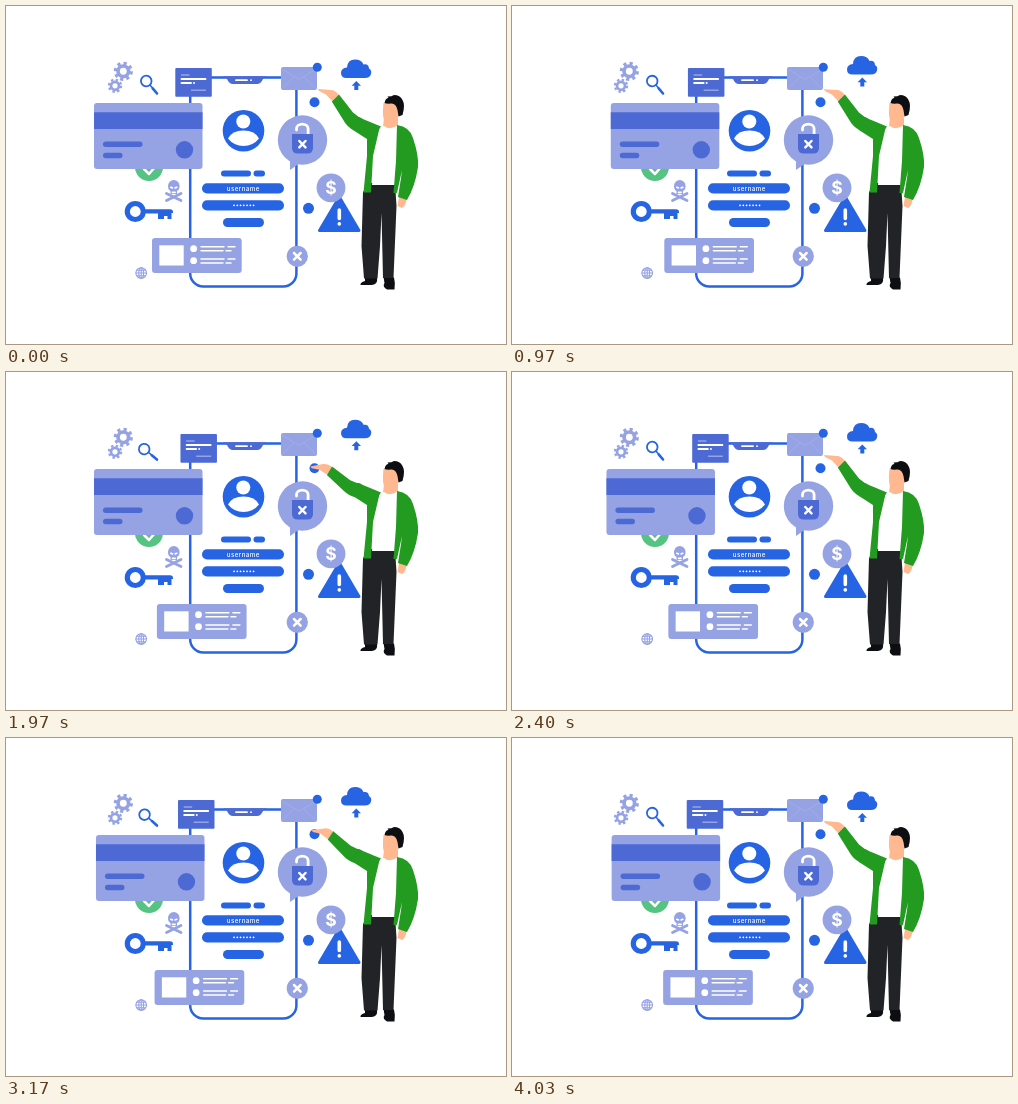
Recreate the animation shown at these times as an HTML page. Size 500 px wide and 338 px high, loop 4070 ms.

```html
<!DOCTYPE html>
<html lang="en">
<head>
<meta charset="utf-8">
<title>Account security</title>
<style>
html, body { margin: 0; width: 100%; height: 100%; overflow: hidden; background: #fff }
svg { display: block; width: 500px; height: 338px }
.b { fill: #2764e3 } .l { fill: #95a2e3 } .m { fill: #4c69d4 } .w { fill: #fff }
.g { fill: #229b20 } .s { fill: #ffb88f } .k { fill: #222327 } .n { fill: #0d0e12 }
.sb, .sl, .sw { fill: none; stroke-linecap: round; stroke-linejoin: round }
.sb { stroke: #2764e3 } .sl { stroke: #95a2e3 } .sw { stroke: #fff }
text { text-anchor: middle; fill: #fff; font-family: Inter, sans-serif }
</style>
</head>
<body>
<svg viewBox="0 0 500 338">
  <!-- gears -->
  <g id="gears" fill="none" stroke="#95a2e3"></g>
  <g id="lens">
    <circle class="sb" cx="139.800" cy="75.400" r="5.300" stroke-width="1.800"/>
    <path class="sb" d="M143.800 79.500L146.200 82" stroke-width="1.600"/>
    <path class="sb" d="M146.500 82.500L151 87.500" stroke-width="2.600"/>
  </g>

  <!-- phone -->
  <rect x="184.200" y="71.500" width="106.200" height="208.900" rx="13" class="sb" stroke-width="2.500"/>
  <path class="m" d="M217 70.300H261L257 73Q255 78 251 78H227Q223 78 221 73Z"/>
  <path class="sw" d="M230 74.200H241M245 74.200h.1" stroke-width="1.800"/>
  <circle class="b" cx="237.500" cy="124.800" r="20.800"/>
  <circle class="w" cx="237.300" cy="115.500" r="7"/>
  <path class="w" d="M222 132.500Q226 124.500 237.500 124.500T253 132.500Q247 140 237.500 140T222 132.500Z"/>
  <g class="b">
    <rect x="215" y="164.500" width="30" height="6" rx="3"/>
    <rect x="247.500" y="164.500" width="11.500" height="6" rx="3"/>
    <rect x="196" y="177.200" width="82" height="10.300" rx="5.100"/>
    <rect x="196" y="194.200" width="82" height="10.300" rx="5.100"/>
    <rect x="217" y="212" width="41" height="9" rx="4.500"/>
  </g>
  <text x="237.300" y="184.500" font-size="6.200" font-weight="500" letter-spacing=".450">username</text>
  <path class="sw" d="M228 199.300H248" stroke-width="1.700" stroke-dasharray=".1 3.150"/>

  <!-- envelope -->
  <rect class="l" x="275" y="61" width="36" height="23" rx="2"/>
  <path d="M276 63L293 73.500L310 63M276 82.500L288 71M310 82.500L298 71" fill="none" stroke="#a8b2e9" stroke-width=".7"/>
  <circle class="b" cx="311.300" cy="61.300" r="4.500"/>

  <!-- lock bubble -->
  <path class="l" d="M284 150V164L297 155Z"/>
  <circle class="l" cx="296.500" cy="134" r="24.700"/>
  <path class="sw" d="M290.500 124V122.500a5.800 4.300 0 0 1 11.600 0V129" stroke-width="2.800"/>
  <path class="m" d="M286 128H307V142Q307 147.500 301 147.500H292Q286 147.500 286 142Z"/>
  <path class="sw" d="M293.300 135l6.200 6.400m0-6.400l-6.200 6.400" stroke-width="2.500"/>

  <!-- badges -->
  <path class="b" d="M333.300 191L353 224.500H313.500Z" stroke="#2764e3" stroke-width="3" stroke-linejoin="round"/>
  <path class="sw" d="M333.300 204V212.500M333.300 217.800v.1" stroke-width="3.600"/>
  <circle class="l" cx="325" cy="181.800" r="14.400"/>
  <text x="325" y="188.200" font-size="17.500" font-weight="700">$</text>
  <circle class="l" cx="291.300" cy="250.300" r="10.600"/>
  <path class="sw" d="M288 247l6.600 6.600m0-6.600l-6.600 6.600" stroke-width="2.500"/>
  <circle class="b" cx="308.500" cy="96.300" r="5"/>
  <circle class="b" cx="302.500" cy="202.300" r="5.500"/>

  <!-- check, key, skull, globe -->
  <circle cx="143" cy="161" r="14" fill="#55c381"/>
  <path class="sw" d="M138 163l5 5 6-7" stroke-width="2.500"/>
  <circle class="sb" cx="129.300" cy="205.500" r="8" stroke-width="5.200"/>
  <path class="b" d="M138 203.300H164Q167 203.300 167 206V207H165.500V213H161.500V210H158V213H152V207.500H138Z"/>
  <path class="sl" d="M160.500 187.500L175 194.500M175 187.500L160.500 194.500" stroke-width="2.800"/>
  <path class="l" d="M162 180a5.800 6 0 0 1 11.600 0Q173.600 184 171 185V188H164.500V185Q162 184 162 180Z"/>
  <path class="sw" d="M164.800 181.300l1.600.6M170.800 181.300l-1.600.6M166.500 186.300h2.600" stroke-width="1.700"/>
  <g class="sl" stroke-width="1.100">
    <circle cx="135.200" cy="267" r="5.300"/>
    <ellipse cx="135.200" cy="267" rx="2.400" ry="5.300"/>
    <path d="M130 267H140.500M131 264.300H139.500M131 269.700H139.500M135.200 262V272"/>
  </g>

  <!-- cloud -->
  <g id="cloud" class="b">
    <path d="M340.500 72Q335 72 335 67T341 61.500Q341.500 53.500 349 53.500Q355.500 53.500 357.500 58.500Q362.500 57.500 363 62.500Q366 64 365 68Q364 72 359 72Z"/>
    <path d="M350.300 75L355 79.700H352.300V84H348.300V79.700H345.600Z"/>
  </g>

  <!-- sliding cards -->
  <g id="bank">
    <rect class="l" x="88" y="97" width="108.500" height="66" rx="3"/>
    <path class="m" d="M88 106.300H196.500V123H88Z"/>
    <rect class="m" x="97" y="135.500" width="39.500" height="5.500" rx="2.700"/>
    <rect class="m" x="97" y="146.800" width="19.500" height="5.500" rx="2.700"/>
    <circle class="m" cx="178.500" cy="143.800" r="8.700"/>
  </g>
  <g id="note">
    <rect class="m" x="169.300" y="62" width="36.500" height="28.700" rx="1"/>
    <path d="M175 69H183.500M185 84.300H200" stroke="#95a2e3" stroke-width="1.600"/>
    <path class="sw" d="M175.500 73H199.500M175.500 77H185M188 77h.1" stroke-width="1.900"/>
  </g>
  <g id="profile">
    <rect class="l" x="146" y="232" width="89.700" height="35" rx="3"/>
    <path class="w" d="M153.300 239.300H177.700V259.500H153.300Z"/>
    <circle class="w" cx="187.600" cy="242.700" r="3.400"/>
    <circle class="w" cx="187.600" cy="254.700" r="3.400"/>
    <path class="sw" d="M195 240.700H218M222 240.700H229M195 244.700H217M220 244.700H225M195 253H218M222 253H229M195 257H217M220 257H225" stroke-width="1.400"/>
  </g>

  <!-- man -->
  <path class="n" d="M359 271L371 271.500Q372 278.500 366 279H354.500Q354 276.500 359 275ZM377.500 271L388 271.500Q389.500 277 388.500 283.500H381Q376 280.500 378.500 277Z"/>
  <path class="k" d="M364 177H389L390.500 200L387.500 272H377L375.500 207L374 240L371.500 272.500H358L355.500 240L357 186Z"/>
  <path class="s" d="M378 112H392V121Q384 127 377 121ZM393 191H401Q400 200 396 202L391.500 200Z"/>
  <path class="w" d="M371 123L378 120Q384 125 392 119L396 150L389 179H366Z"/>
  <path class="g" d="M374 120L364 124L361 134V150L357.500 186.500H365L367 150ZM391 119Q404 121 407 132Q413 150 412 161Q409 181 401 194L392 191L395 172L396 164L391 187H387.500L390 155Z"/>
  <path class="s" d="M377.500 97Q375.500 113 380 118Q391 121 394 104L391 96Z"/>
  <path class="n" d="M378.500 97Q379.500 92 382.500 92L381.500 90.500Q386 90.500 388 89Q394 89 396.500 94Q399.500 99 396.500 109L392.500 110.500L391.500 104Q390 97 385 97.500Q381 98 378.500 97Z"/>
  <g id="arm">
    <path class="s" d="M326 95L333 89Q329 84 325 84L312 83L313 85L320 88.500Z"/>
    <path class="g" d="M325.800 95.500L333 88.500L347 106.500L358 115L348 124.500Q341 121 337 113.500Z"/>
  </g>
  <circle class="g" cx="351.500" cy="118" r="7"/>
  <path class="g" d="M352 111L375 120.500L364 135L347 124Z"/>
</svg>
<script>
const LOOP = 4070, TAU = 2 * Math.PI;
const $ = id => document.getElementById(id);

// time, value pairs; cosine ease between neighbours
const bankKeys = [[0, 0], [430, 0], [1090, 11.7], [1900, 0], [2060, 0], [2700, 11.7], [3345, 0], [4070, 11.7]];
const noteKeys = [[0, 0], [550, 11], [1520, 0], [2460, 11], [2980, 0], [3550, 10.7], [4520, 0]];
const armKeys = [[0, 0], [560, 17], [1000, 0], [1540, -7], [2040, 16], [2500, -2], [2830, 3], [3430, 18], [4070, 0]];

function ease(keys, t) {
  const i = keys.findIndex(k => k[0] > t);
  const [t0, a] = keys[i - 1], [t1, b] = keys[i];
  return a + (b - a) * (1 - Math.cos(Math.PI * (t - t0) / (t1 - t0))) / 2;
}

function gear(x, y, r) {
  const ring = `<circle cx="${x}" cy="${y}" r="${r * .55}" stroke-width="${r * .38}"/>`;
  const step = TAU * r * .84 / 16;
  return ring + `<circle cx="${x}" cy="${y}" r="${r * .84}" stroke-width="${r * .32}" stroke-dasharray="${step}"/>`;
}
$('gears').innerHTML = gear(117.3, 65.3, 9.6) + gear(109, 79.8, 7.2);

const move = (id, x, y = 0) => $(id).setAttribute('transform', `translate(${x} ${y})`);
const turn = (id, deg, x, y) => $(id).setAttribute('transform', `rotate(${deg} ${x} ${y})`);

function draw(now) {
  const t = now % LOOP;
  const slide = ease(noteKeys, t), swing = ease(armKeys, t);
  move('bank', ease(bankKeys, t));
  move('note', slide);
  move('profile', slide * .95);
  move('cloud', 0, -2.9 * (1 - Math.cos(TAU * 3 * t / LOOP)));
  turn('arm', -swing, 352, 118);
  turn('lens', (3 - swing) * .65, 151.5, 88);
  requestAnimationFrame(draw);
}
draw(0);
</script>
</body>
</html>
```
